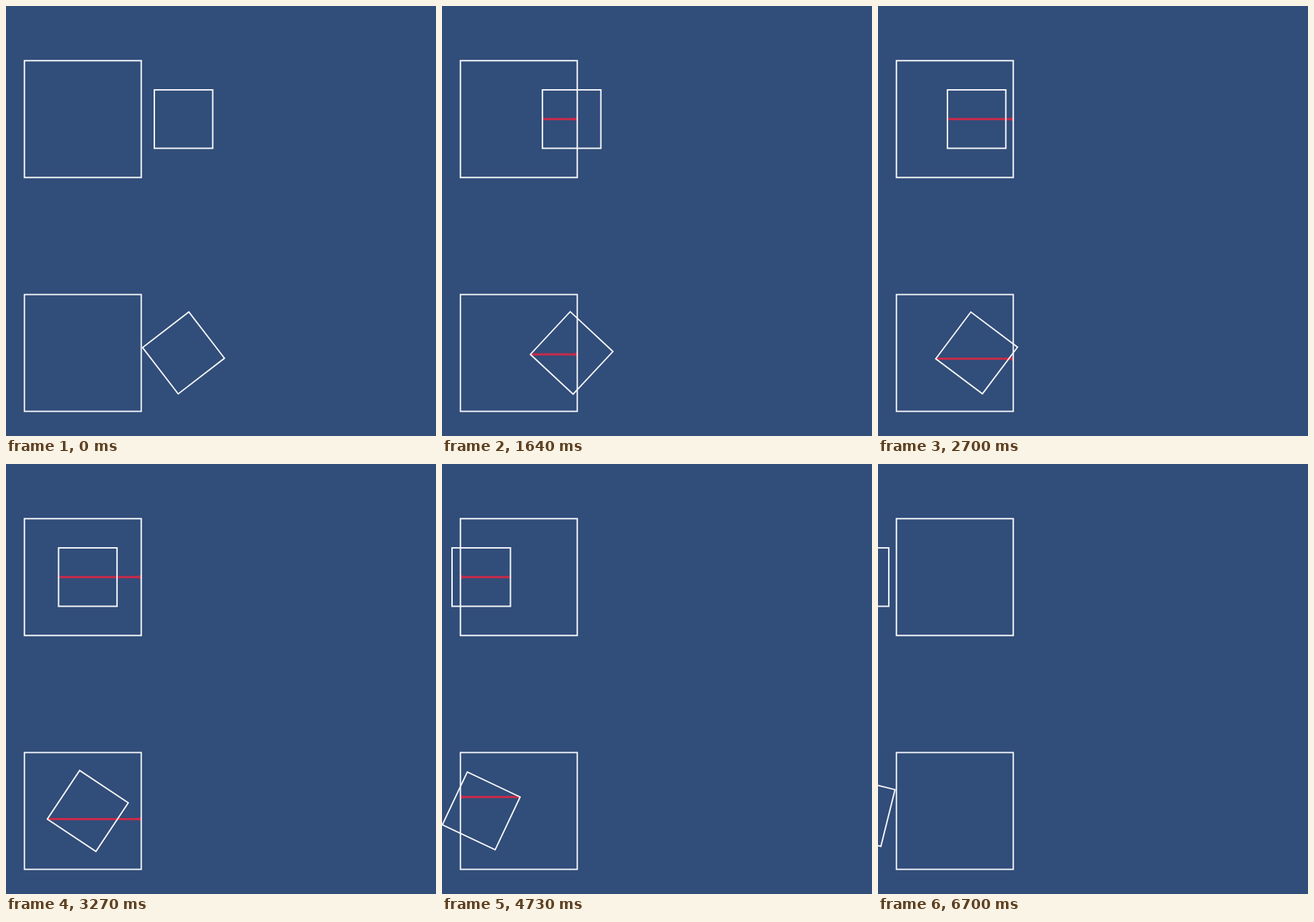
Recreate the animation shown at these times as an HTML page with a canvas. Size 600x600 px, loop 6730 ms.

```html
<!DOCTYPE html>
<html lang="en">
<head>
<meta charset="utf-8">
<title>Box overlap</title>
<style>
html, body { margin: 0; width: 100%; height: 100%; overflow: hidden; background: #314d79; }
canvas { display: block; }
</style>
</head>
<body>
<canvas width="600" height="600"></canvas>
<script>
const ctx = document.querySelector('canvas').getContext('2d');
const LOOP = 6730, STEP = LOOP / 222;
const UNIT = 81.5, WALL_X = 107.2;
const LEFT = WALL_X - UNIT, RIGHT = WALL_X + UNIT;

function square(x, y, size, angle = 0) {
  ctx.save();
  ctx.translate(x, y);
  ctx.rotate(angle);
  ctx.strokeRect(-size / 2, -size / 2, size, size);
  ctx.restore();
}

// Red line from the deepest point of the moving box to the nearest wall
function overlap(x, y, reach, slope) {
  const side = x > WALL_X ? -1 : 1;
  const tip = x + side * reach;
  const wall = side < 0 ? RIGHT : LEFT;
  if ((tip - wall) * side <= 0) return;
  const lineY = y + side * slope;
  ctx.fillRect(Math.min(tip, wall), lineY - 1.5, Math.abs(tip - wall), 3);
  ctx.fillRect(wall + side * 1.5 - 1.5, lineY - 2.5, 3, 5);
}

function scene(y, x, turn, reach, slope) {
  overlap(x, y, reach, slope);
  square(WALL_X, y, 2 * UNIT);
  square(x, y, UNIT, turn);
}

function draw(now) {
  const t = Math.floor((now % LOOP + 5) / STEP) % 222 * STEP;
  const x = 247.7 - 0.0408 * t;
  const tilt = 0.129 - 0.0001 * t;
  const radius = UNIT / Math.SQRT2;

  ctx.fillStyle = '#314d79';
  ctx.fillRect(0, 0, 600, 600);
  ctx.strokeStyle = '#f4f6f9';
  ctx.fillStyle = '#cc2a48';
  ctx.lineWidth = 2;
  scene(157.8, x, 0, UNIT / 2, 0);
  ctx.lineWidth = 1.9;
  scene(484.1, x, tilt + Math.PI / 4, radius * Math.cos(tilt), radius * Math.sin(tilt));
}

const start = performance.now();
function tick() {
  draw(performance.now() - start);
  requestAnimationFrame(tick);
}
tick();
</script>
</body>
</html>
```
